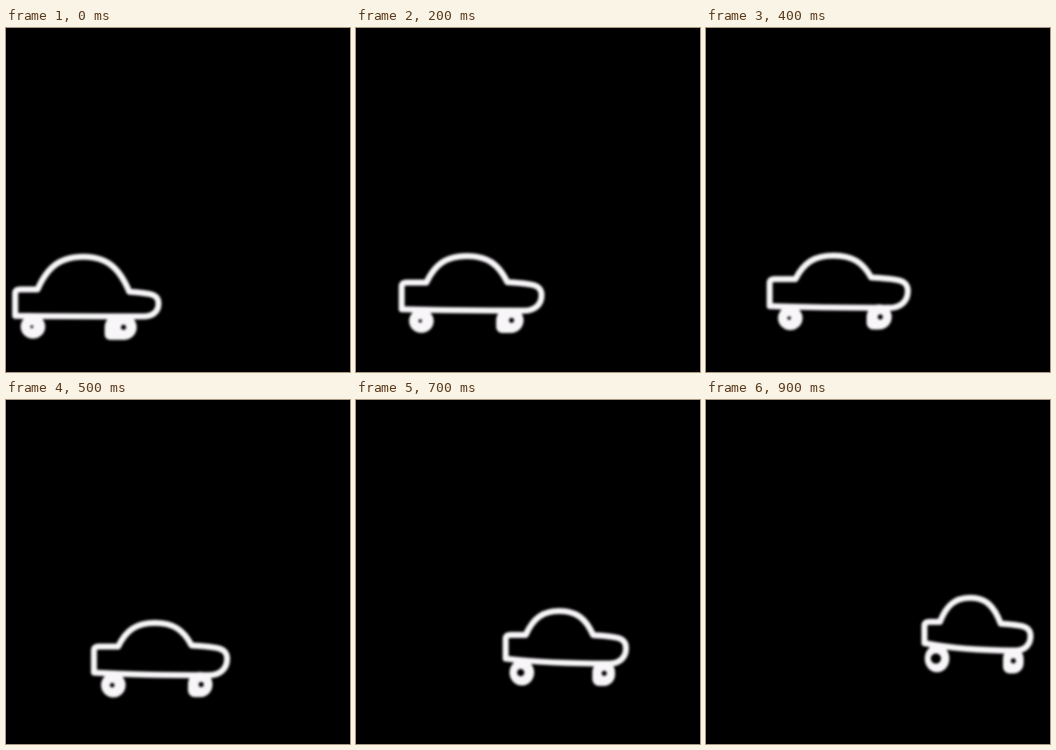
Write an HTML page with a canvas that moves like this. It is 600 px wide and 600 px high and loops after 1 s.

```html
<!DOCTYPE html>
<html>
<head>
<meta charset="utf-8">
<style>
  html, body { margin: 0; height: 100%; background: #000; overflow: hidden; }
  canvas { display: block; filter: blur(1.9px); }
</style>
</head>
<body>
<canvas width="600" height="600"></canvas>
<script>
const ctx = document.querySelector('canvas').getContext('2d');
const INK = '#f8f6f8';

// The car's measures at the start, the middle and the end of its drive.
const poses = [
  { left: 16, right: 266, hood: 456, tip: 481, floorL: 502, floorR: 503,
    domeL: 55, domeR: 215, roof: 399, nose: 460,
    rearX: 47, rearY: 521, frontX: 200, frontY: 522, frontW: 28, hole: 2.5 },
  { left: 111, right: 352, hood: 438, tip: 459, floorL: 485, floorR: 488,
    domeL: 156, domeR: 288, roof: 397, nose: 435,
    rearX: 147, rearY: 506, frontX: 302, frontY: 504, frontW: 22, hole: 3 },
  { left: 381, right: 566, hood: 387, tip: 412, floorL: 424, floorR: 437,
    domeL: 408, domeR: 514, roof: 345, nose: 390,
    rearX: 403, rearY: 451, frontX: 536, frontY: 455, frontW: 18, hole: 9 }
];

function mix(a, b, k) {
  const p = {};
  for (const key in a) p[key] = a[key] + (b[key] - a[key]) * k;
  return p;
}

// Slows down over the first four steps, then picks up speed.
function poseAt(step) {
  return step < 4
    ? mix(poses[0], poses[1], 1 - (1 - step / 4) ** 1.6)
    : mix(poses[1], poses[2], ((step - 4) / 5) ** 1.15);
}

function drawBody(p) {
  const half = (p.domeR - p.domeL) / 2, mid = p.domeL + half;
  const beak = p.right - p.domeR;
  const shoulder = y => y + (p.roof - y) * 0.7;
  ctx.beginPath();
  ctx.moveTo(p.left, p.floorL);
  ctx.lineTo(p.left, p.hood + 7);
  ctx.quadraticCurveTo(p.left, p.hood, p.left + 9, p.hood);
  ctx.lineTo(p.domeL, p.hood);
  ctx.bezierCurveTo(p.domeL + half * 0.22, shoulder(p.hood), mid - half * 0.5, p.roof, mid, p.roof);
  ctx.bezierCurveTo(mid + half * 0.5, p.roof, p.domeR - half * 0.22, shoulder(p.nose), p.domeR, p.nose);
  ctx.bezierCurveTo(p.domeR + beak * 0.7, p.nose + 3, p.right, p.nose + 3, p.right, p.tip);
  ctx.bezierCurveTo(p.right, p.tip + (p.floorR - p.tip) * 0.6,
    p.right - beak * 0.2, p.floorR, p.right - beak * 0.5, p.floorR);
  ctx.quadraticCurveTo(p.left + (p.right - p.left) * 0.35, p.floorR, p.left, p.floorL);
  ctx.closePath();
  ctx.stroke();
}

function disc(x, y, rx, ry, color) {
  ctx.fillStyle = color;
  ctx.beginPath();
  ctx.ellipse(x, y, rx, ry, 0, 0, Math.PI * 2);
  ctx.fill();
}

function draw(p) {
  ctx.fillStyle = '#000';
  ctx.fillRect(0, 0, 600, 600);

  disc(p.rearX, p.rearY, 21.5, 19.5 + p.hole / 2, INK);
  disc(p.rearX - 2, p.rearY, p.hole, p.hole, '#000');

  // The front wheel has a blunt lower left corner.
  const r = p.frontW;
  ctx.fillStyle = INK;
  ctx.beginPath();
  ctx.roundRect(p.frontX - r, p.frontY - 22, r * 2, 44, [r, r, r, 12]);
  ctx.fill();
  disc(p.frontX + (r - 18) / 2, p.frontY, 4.5, 4.5, '#000');

  drawBody(p);
}

ctx.strokeStyle = INK;
ctx.lineWidth = 10.5;
ctx.lineJoin = 'round';

const start = performance.now();
function tick() {
  const t = (performance.now() - start) % 1000;
  draw(poseAt(Math.floor(t / 100)));
  requestAnimationFrame(tick);
}
tick();
</script>
</body>
</html>
```
